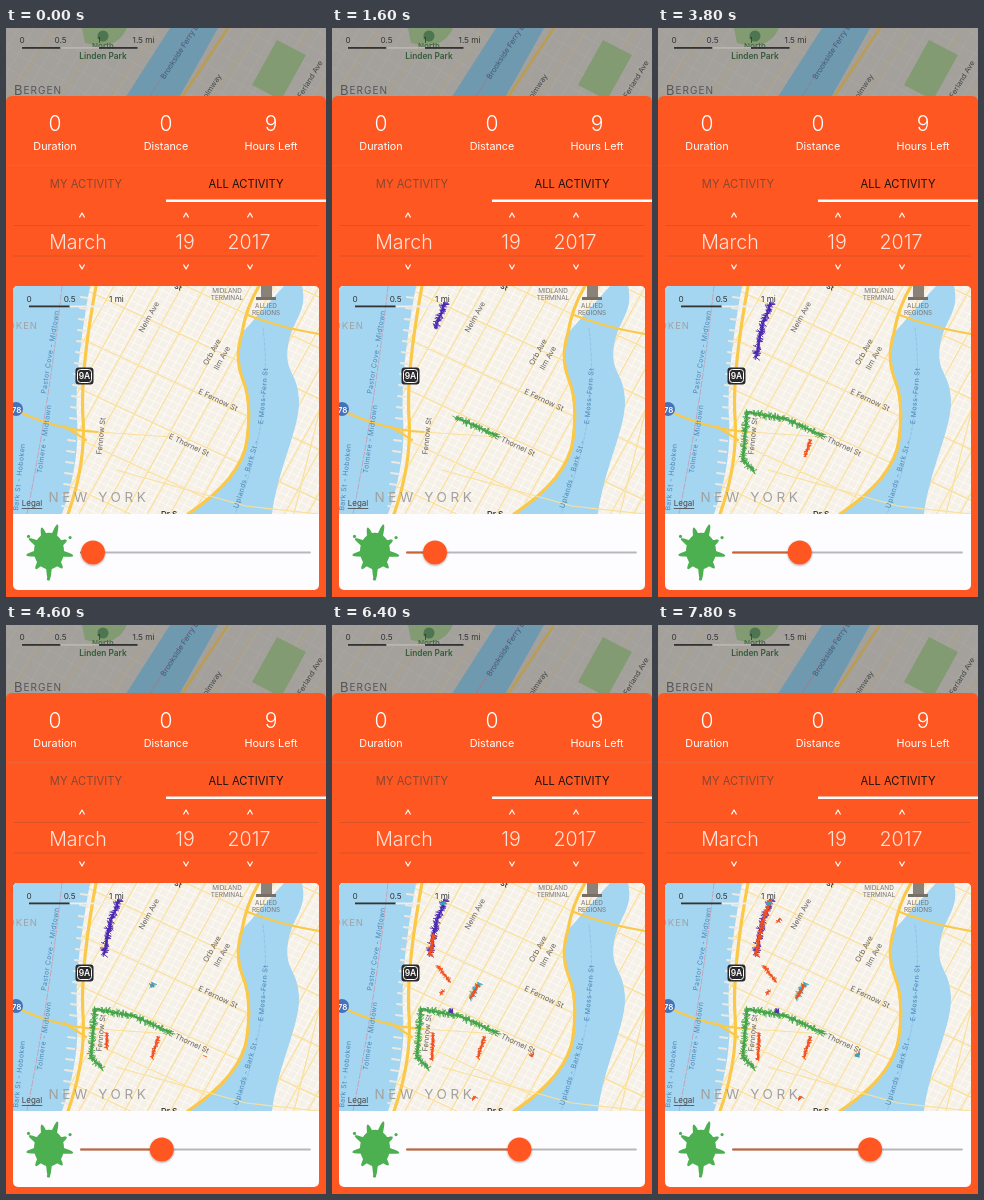
Animation, 320 px wide and 569 px high, one loop 8000 ms. Source, as an HTML page:

```html
<!DOCTYPE html>
<html lang="en">
<head>
<meta charset="utf-8">
<title>Activity map</title>
<style>
  html, body { margin: 0; width: 100%; height: 100%; overflow: hidden; background: #ff5722; }
  svg { display: block; width: 100vw; height: 100vh; }
  text { font-family: Inter, "Open Sans", sans-serif; text-anchor: middle; dominant-baseline: central; }
  path { fill: none; stroke-linecap: round; stroke-linejoin: round; }
  .water { fill: #a5d6f1; }
  .major { stroke: #fac949; stroke-width: 3.2; }
  .medium { stroke: #fbe09a; stroke-width: 1.2; }
  .street { stroke: #fffdf8; stroke-width: .8; }
  .bold { font-weight: 600; }
  .light { font-weight: 300; }
  .ferry { letter-spacing: .4px; }
</style>
</head>
<body>
<svg viewBox="0 0 320 569" preserveAspectRatio="none">
  <defs>
    <clipPath id="mapClip"><path d="M7 486V263q0-5 5-5H308q5 0 5 5V486Z"/></clipPath>
    <filter id="shadow" x="-50%" y="-50%" width="200%" height="200%">
      <feDropShadow dx="0" dy="1" stdDeviation="1.3" flood-opacity=".35"/>
    </filter>
  </defs>

  <rect width="320" height="75" fill="#a4a19c"/>
  <g id="backdrop"></g>

  <path d="M0 569V74q0-6 6-6H314q6 0 6 6V569Z" style="fill:#ff5722"/>
  <path d="M0 137.5H320" stroke="#e96a44" stroke-width=".7"/>
  <rect x="160" y="171.5" width="160" height="2.5" fill="#fff"/>
  <path d="M8 197.5H312M8 228H312" stroke="#d2502a" stroke-width=".8"/>
  <g id="card"></g>
  <rect x="7" y="258" width="306" height="304" rx="5" fill="#fdfcfe"/>

  <g clip-path="url(#mapClip)">
    <rect x="7" y="258" width="306" height="228" fill="#f5f0e8"/>
    <g id="map"></g>
    <g id="trails"></g>
  </g>

  <g id="splat" fill="#4caf50"></g>
  <path d="M75 524.5H304" stroke="#b8b7bb" stroke-width="1.8"/>
  <path id="filled" stroke="#c96338" stroke-width="2"/>
  <circle id="knob" cy="524.5" r="12" fill="#ff5722" filter="url(#shadow)"/>
</svg>
<script>
const $ = id => document.getElementById(id);
const LOOP = 8000, STEP = 200, TAU = 2 * Math.PI;
const GREEN = '#45a449', PURPLE = '#4a28b0', RED = '#f4511e', CYAN = '#35a5c2';

function randomizer(seed) {
  return () => (seed = (seed * 16807) % 2147483647) / 2147483647;
}

const path = (cls, d) => `<path class="${cls}" d="${d}"/>`;

function label(text, x, y, size, fill, angle = 0, cls = '', spacing = 0) {
  return `<text x="${x}" y="${y}" font-size="${size}" fill="${fill}" class="${cls}"` +
    (spacing ? ` letter-spacing="${spacing}"` : '') + ` transform="rotate(${angle} ${x} ${y})">${text}</text>`;
}

const stack = (words, x, y) => words.map((word, i) => label(word, x, y + 7 * i, 6.4, '#77736f')).join('');

// Lines at the given angle, set apart by `gap` to both sides of (x, y).
function parallels(x, y, angle, gap, reach = 340) {
  const a = angle * Math.PI / 180, ux = Math.cos(a), uy = Math.sin(a);
  let d = '';
  for (let off = -reach; off <= reach; off += gap) {
    const cx = x - uy * off, cy = y + ux * off;
    d += `M${cx - ux * reach} ${cy - uy * reach}L${cx + ux * reach} ${cy + uy * reach}`;
  }
  return d;
}

function scaleBar(x, y, step, marks, pale) {
  return marks.map((mark, i) =>
    (i ? `<rect x="${x + (i - 1) * step}" y="${y}" width="${step}" height="1.8" fill="${i % 2 ? '#333' : pale}"/>` : '') +
    label(mark, x + i * step + (mark.endsWith('mi') ? 6 : 0), y - 7, 8.2, '#333')).join('');
}

function drawBackdrop() {
  const ink = '#454545';
  $('backdrop').innerHTML =
    `<path d="${parallels(0, 0, -59, 13)}${parallels(0, 0, 30, 17)}" stroke="#aaa8a2" stroke-width=".8"/>` +
    `<path d="${parallels(30, 35, -55, 42)}" stroke="#b3a078" stroke-width="1"/>` +
    '<path d="M164 0H212L170 75H116Z" style="fill:#6f99af"/>' +
    '<path d="M222 0L172 75" stroke="#bb9c53" stroke-width="2.5"/>' +
    '<path d="M271 12L300 27L275 72L246 57ZM76 0H121Q110 24 79 15Z" style="fill:#839b73"/>' +
    '<path d="M187 0L143 70" stroke="#a4788a" stroke-dasharray="5 2"/>' +
    '<circle cx="97" cy="8" r="5.5" fill="#4c7550"/>' +
    label('North', 97, 18, 8, '#476a49', 0, 'bold') +
    label('Linden Park', 97, 28, 8.3, '#335b3a', 0, 'bold') +
    label('B<tspan font-size="10">ERGEN</tspan>', 32, 62, 13, '#55565a', 0, '', 1) +
    label('Brookside Ferry Landing', 180, 14, 7.5, '#355f80', -57) +
    label('Tolmway', 205, 60, 7.5, ink, -57) +
    label('Ferland Ave', 304, 51, 7.5, ink, -59) +
    scaleBar(16, 19, 38.5, ['0', '0.5', '1', '1.5 mi'], '#b9b6b0');
}

function drawCard() {
  const stat = (value, name, x) => label(value, x, 95, 21, '#fff', 0, 'light') + label(name, x, 118, 10.8, '#fff');
  const picker = (value, x, arrowX) => label(value, x, 213.5, 19.6, '#ffe3d8', 0, 'light') +
    `<path d="M${arrowX - 2.3} 189l2.3-4l2.3 4m-4.6 48l2.3 4l2.3-4" stroke="#fff" stroke-width="1.2"/>`;
  $('card').innerHTML =
    stat('0', 'Duration', 49) + stat('0', 'Distance', 160) + stat('9', 'Hours Left', 265) +
    label('MY ACTIVITY', 80, 155.5, 11.2, '#874833') + label('ALL ACTIVITY', 240, 155.5, 11.2, '#1d120e') +
    picker('March', 72, 76) + picker('19', 179, 180) + picker('2017', 243, 244);
}

function drawMap() {
  const ink = '#66615c', blue = '#4a86b5', gray = '#a3a09e', avenue = -61, cross = 25;
  const westRoad = 'M90 258Q74 345 77 390T62 486';
  const eastBank = 'Q228 330 237 352T241 412T182 486';
  const street = (name, x, y, angle) => label(name, x, y, 7.5, ink, angle);
  const ferry = (name, x, y, angle) => label(name, x, y, 7, blue, angle, 'ferry');

  let piers = '';
  for (let y = 270; y < 480; y += 11) piers += `M${83 - (y - 258) * .09} ${y}l-7-1`;

  const streets =
    path('street', parallels(160, 370, avenue, 7.7) + parallels(160, 370, cross, 7.4)) +
    path('medium', parallels(160, 370, avenue, 20) + parallels(160, 370, cross, 46));
  const waters =
    `<g class="water"><path transform="translate(-6)" style="fill:inherit" d="${westRoad}H7V258Z"/>` +
    `<path style="fill:inherit" d="M278 258L236 305${eastBank}H266C272 440 294 400 293 372S278 345 282 318S302 285 296 258Z"/></g>` +
    `<path d="${piers}" stroke="#eee9df" stroke-width="2"/>` +
    '<path d="M56 258Q44 370 21 486" stroke="#c4a3b8" stroke-dasharray="6 2"/>' +
    '<path d="M257 300Q268 390 229 486" stroke="#8dbbe0" stroke-width=".8" stroke-dasharray="3 2"/>';
  const roads =
    path('major', `${westRoad}M253 258Q240 280 236 305${eastBank}`) +
    path('major" stroke-width="2" style="stroke-width:2.2', 'M7 381Q50 402 92 404M58 398L80 412M242 287Q275 300 313 306') +
    path('medium', 'M110 442L240 478L313 486M288 486L313 385M92 404L166 409');
  const icons =
    '<rect x="69.5" y="339.5" width="18" height="17" rx="3" fill="#29292b"/>' +
    '<rect x="71.5" y="341.5" width="14" height="13" rx="3" fill="none" stroke="#fff"/>' +
    '<circle cx="10" cy="381" r="7" fill="#4672ba"/>' +
    '<rect x="255" y="258" width="11" height="11" fill="#8a8178"/><rect x="250" y="269" width="20" height="3" fill="#776e66"/>' +
    label('9A', 78.5, 348.2, 8.5, '#fff', 0, 'bold') + label('78', 10.5, 382, 8, '#fff', 0, 'bold');
  const names =
    street('Nelm Ave', 143, 289, avenue) + street('Orb Ave', 206, 324, avenue) + street('Ilm Ave', 216, 330, avenue) +
    street('E Fernow St', 212, 372, cross) + street('E Thornel St', 183, 417, cross) + street('Fennow St', 95, 408, -84) +
    stack(['MIDLAND', 'TERMINAL'], 221, 263) + stack(['ALLIED', 'REGIONS'], 260, 278) +
    ferry('Pastor Cove - Midtown', 44, 324, -81) + ferry('Tolmere - Midtown', 38, 411, -82) +
    ferry('Bark St - Hoboken', 13, 449, -84) +
    ferry('E Moss-Fern St', 257, 368, -85) + ferry('Uplands - Bark St -', 240, 446, -73) +
    label('Dr S', 163, 486, 8, '#333', 0, 'bold') + label('St', 172, 259, 7, '#333', cross, 'bold') +
    label('HOBOKEN', 5, 297, 9.5, gray, 0, '', 1) + label('NEW YORK', 93, 469, 13.5, gray, 0, '', 3.6) +
    label('<tspan text-decoration="underline">Legal</tspan>', 26, 475, 8, '#444') +
    scaleBar(23, 277.5, 40.7, ['0', '0.5', '1 mi'], '#eee');
  $('map').innerHTML = streets + waters + roads + icons + names;
}

// A round body whose edge swells into uneven drips.
function drawSplat() {
  let d = '';
  for (let i = 0; i < 180; i++) {
    const a = i / 180 * TAU;
    const drip = Math.max(0, Math.sin(9 * a + .5 * Math.sin(2 * a)));
    const r = 17 + drip ** 1.5 * (8 + 3 * Math.sin(4 * a + 1));
    d += `${i ? 'L' : 'M'}${43 + .88 * r * Math.cos(a)} ${523 + 1.07 * r * Math.sin(a)}`;
  }
  const drops = [0, 1, 2].map(i => {
    const a = -.5 + i * TAU / 3;
    return `<circle cx="${43 + 24 * Math.cos(a)}" cy="${523 + 28 * Math.sin(a)}" r="1.6"/>`;
  });
  $('splat').innerHTML = `<path d="${d}Z" style="fill:inherit"/>` + drops.join('');
}

// Lays paint hairs along a route that is walked at constant speed from `begin` to `end`.
function trail(color, spread, begin, end, ...points) {
  const random = randomizer(begin + spread * 1000), hairs = [];
  const legs = points.slice(1).map(([x, y], i) => Math.hypot(x - points[i][0], y - points[i][1]));
  const total = legs.reduce((sum, leg) => sum + leg, 0);
  let walked = 0;
  legs.forEach((leg, i) => {
    const [x0, y0] = points[i], [x1, y1] = points[i + 1];
    for (let s = 0; s < leg; s += .45) {
      const a = random() * TAU, r = spread * (.35 + .65 * random());
      const x = x0 + (x1 - x0) * s / leg, y = y0 + (y1 - y0) * s / leg;
      const dx = r * Math.cos(a), dy = r * Math.sin(a);
      hairs.push({
        time: begin + (end - begin) * (walked + s) / total,
        d: `M${x - dx * .4} ${y - dy * .4}L${x + dx} ${y + dy}`
      });
    }
    walked += leg;
  });
  const node = document.createElementNS($('trails').namespaceURI, 'path');
  node.setAttribute('stroke', color);
  node.setAttribute('stroke-width', .9);
  $('trails').append(node);
  return { node, hairs };
}

const spot = (color, time, x, y) => trail(color, 3, time, time + 400, [x - 1.5, y + 1], [x + 1.5, y - 1]);

const purpleRoute = [[113, 275], [104, 298], [98, 330]];
const trails = [
  trail(GREEN, 4.5, 600, 3800, [165, 408], [128, 391], [89, 384], [85, 432], [96, 443]),
  trail(PURPLE, 5, 700, 2600, ...purpleRoute),
  trail(RED, 3, 3100, 4000, [152, 412], [146, 433]),
  trail(RED, 2.6, 4100, 5000, [101, 408], [100, 435]),
  trail(CYAN, 4, 4400, 5200, [147, 358], [138, 374]),
  trail(RED, 3, 4600, 5400, [146, 360], [139, 373]),
  spot(RED, 4600, 200, 430),
  spot(RED, 4700, 110, 367),
  spot(RED, 4900, 142, 473),
  trail(RED, 2.8, 5500, 6300, [106, 341], [118, 357]),
  trail(RED, 3.5, 5600, 7800, ...purpleRoute.slice().reverse()),
  spot(PURPLE, 5900, 119, 386),
  spot(CYAN, 6000, 112, 278),
  spot(RED, 6700, 121, 295),
  spot(CYAN, 6800, 199, 430)
];

function render(time) {
  const knob = Math.max(87, 103 + (time - 1600) * .0176);
  $('knob').setAttribute('cx', knob);
  $('filled').setAttribute('d', `M75 524.5H${knob}`);
  for (const { node, hairs } of trails)
    node.setAttribute('d', hairs.filter(hair => hair.time <= time).map(hair => hair.d).join(''));
}

drawBackdrop();
drawCard();
drawMap();
drawSplat();
const start = performance.now();
function tick() {
  const time = (performance.now() - start) % LOOP;
  render(Math.floor(time / STEP) * STEP);
  requestAnimationFrame(tick);
}
tick();
</script>
</body>
</html>
```
